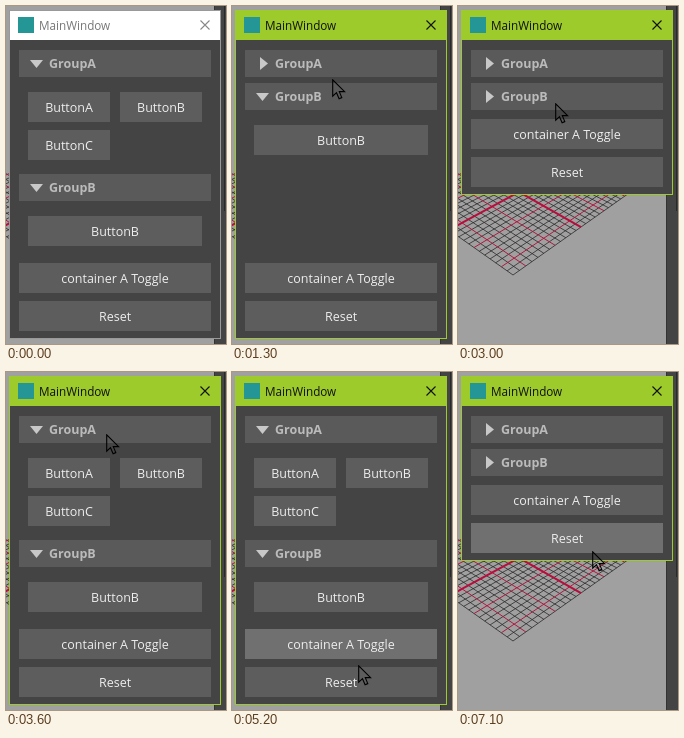
Recreate the animation shown at these times as an HTML page. Size 220x338 px, loop 7.2 s.

```html
<!DOCTYPE html>
<html>
<head>
<meta charset="utf-8">
<style>
html, body { margin: 0; width: 100%; height: 100%; overflow: hidden; background: #a0a0a0; }
#stage { position: relative; width: 220px; height: 338px; overflow: hidden; font: 12.5px "Open Sans", "Noto Sans", sans-serif; }
#stage div, #stage svg { position: absolute; box-sizing: border-box; }
#win { left: 3px; top: 4px; width: 212px; background: #444; border: 1px solid #999; }
#title { left: 4px; top: 5px; width: 210px; height: 29px; background: #fff; color: #777; font-size: 11.7px; line-height: 29px; padding-left: 29px; }
.active #title { background: #9ccb2b; color: #111; }
.active #win { border-color: #9ccb2b; }
#icon { left: 12px; top: 11px; width: 16px; height: 16px; background: #259696; }
.head { left: 13px; width: 192px; height: 27px; background: #5a5a5a; color: #bbb; font-weight: bold; line-height: 28px; padding-left: 30px; }
.btn { height: 30px; background: #5d5d5d; color: #eee; line-height: 31px; text-align: center; white-space: nowrap; }
.hot { background: #707070; }
</style>
</head>
<body>
<div id="stage">
  <svg id="scene" width="220" height="338"></svg>
  <div id="win"></div>
  <div id="title">MainWindow</div>
  <div id="icon"></div>
  <svg width="220" height="40"><path id="close" d="M194.5 14.5l9 9m0-9l-9 9" stroke-width="1.1"/></svg>
</div>
<script>
const LOOP = 7200;
const $ = id => document.getElementById(id);
const stage = $('stage');

// Perspective floor grid behind the window
function drawScene() {
  const at = (i, j) => {
    const u = i / 12, v = j / 12, w = 1 + .161 * u + .114 * v;
    return `${(55 + 87.8 * u - 65 * v) / w} ${(269 - 12.4 * u - 19.5 * v) / w}`;
  };
  let thin = '', red = '', axis = '';
  for (let k = 0; k <= 24; k++) {
    const d = `M${at(k, 0)}L${at(k, 24)}M${at(0, k)}L${at(24, k)}`;
    if (k === 12) axis += d;
    else if (k % 5 === 2) red += d;
    else thin += d;
  }
  $('scene').innerHTML = `
    <clipPath id="c"><rect y="167" width="208" height="171"/></clipPath>
    <g clip-path="url(#c)" fill="none">
      <path d="${thin}" stroke="#2a2a2a" stroke-width=".8"/>
      <path d="${red}" stroke="#b01840"/>
      <path d="${axis}" stroke="#b80d3c" stroke-width="2"/>
    </g>
    <rect x="208" width="12" height="338" fill="#444"/>
    <rect x="208" width="1" height="338" fill="#333"/>
    <rect x="218" width="1" height="205" fill="#292929"/>`;
}

function box(cls, text, x, w) {
  const el = document.createElement('div');
  el.className = cls;
  el.textContent = text;
  if (w) Object.assign(el.style, { left: x + 'px', width: w + 'px' });
  stage.append(el);
  return el;
}

function header(text) {
  const el = box('head', text);
  const svg = document.createElementNS('http://www.w3.org/2000/svg', 'svg');
  svg.setAttribute('width', 40);
  svg.setAttribute('height', 27);
  svg.style.cssText = 'left:0;top:0';
  svg.innerHTML = '<path fill="#c8c8c8"/>';
  el.append(svg);
  el.mark = svg.firstChild;
  return el;
}

drawScene();
const headA = header('GroupA'), headB = header('GroupB');
const a1 = box('btn', 'ButtonA', 22, 82);
const a2 = box('btn', 'ButtonB', 114, 82);
const a3 = box('btn', 'ButtonC', 22, 82);
const b1 = box('btn', 'ButtonB', 22, 174);
const toggle = box('btn', 'container A Toggle', 13, 192);
const reset = box('btn', 'Reset', 13, 192);
stage.insertAdjacentHTML('beforeend', `<svg id="cursor" width="16" height="24" style="left:0;top:0">
  <path d="M.7 .8V17.2L4.5 13.7L7.1 19.8L9.8 18.6L7.3 12.6H12.6Z" stroke="#000" stroke-width="1.1"/></svg>`);
const cursor = $('cursor'), arrow = cursor.firstElementChild;

// [time, group A open, group B open]
const states = [[0, 1, 1], [1300, 0, 1], [2100, 0, 0], [3100, 0, 1], [3600, 1, 1],
  [4400, 0, 1], [4700, 1, 1], [5600, 0, 0]];
// [time, x, y]
const path = [[1300, 100, 73], [1600, 97, 93], [2400, 97, 96], [3000, 97, 97], [3300, 97, 97],
  [3550, 100, 62], [3750, 100, 62], [4200, 125, 273], [4350, 125, 273], [4550, 125, 181],
  [4650, 125, 181], [4800, 125, 273], [5100, 125, 273], [5200, 126, 293], [5400, 127, 317],
  [5850, 127, 317], [6600, 134, 179], [LOOP, 134, 179]];

const stateAt = t => states.filter(s => s[0] <= Math.max(t, 0)).pop();
const bottomAt = t => {
  const [, a, b] = stateAt(t);
  return 189 + 91 * a + 53 * b;
};

function pointer(t) {
  const n = Math.max(1, path.findIndex(p => p[0] > t));
  const p = path[n - 1], q = path[n];
  const u = Math.max(0, (t - p[0]) / (q[0] - p[0]));
  return [1, 2].map(k => Math.round(p[k] + (q[k] - p[k]) * u));
}

function place(el, y, shown = true) {
  el.style.top = y + 'px';
  el.style.display = shown ? '' : 'none';
}

function setMark(head, open) {
  head.mark.setAttribute('d', open ? 'M11 10H24L17.5 18Z' : 'M15 7L23 13.5L15 20Z');
}

function render(t) {
  const [, a, b] = stateAt(t);
  // The window shrinks one beat after its contents fold
  const bottom = Math.max(bottomAt(t), bottomAt(t - 99));
  const yB = 77 + 91 * a;
  const live = t >= 1300;
  stage.className = live ? 'active' : '';
  $('close').setAttribute('stroke', live ? '#111' : '#888');
  $('win').style.height = bottom - 4 + 'px';
  place(headA, 44);
  place(headB, yB);
  setMark(headA, a);
  setMark(headB, b);
  place(a1, 86, a);
  place(a2, 86, a);
  place(a3, 124, a);
  place(b1, yB + 42, b);
  place(toggle, bottom - 76);
  place(reset, bottom - 38);
  toggle.classList.toggle('hot', t >= 4150 && t < 5250);
  reset.classList.toggle('hot', t >= 5250);
  const [x, y] = pointer(t);
  cursor.style.display = live ? '' : 'none';
  cursor.style.transform = `translate(${x}px, ${y}px)`;
  arrow.setAttribute('fill', y < bottom ? 'none' : '#fff');
}

const start = performance.now();
function tick() {
  const t = (performance.now() - start) % LOOP;
  render(Math.floor(t / 100) * 100);
  requestAnimationFrame(tick);
}
tick();
</script>
</body>
</html>
```
